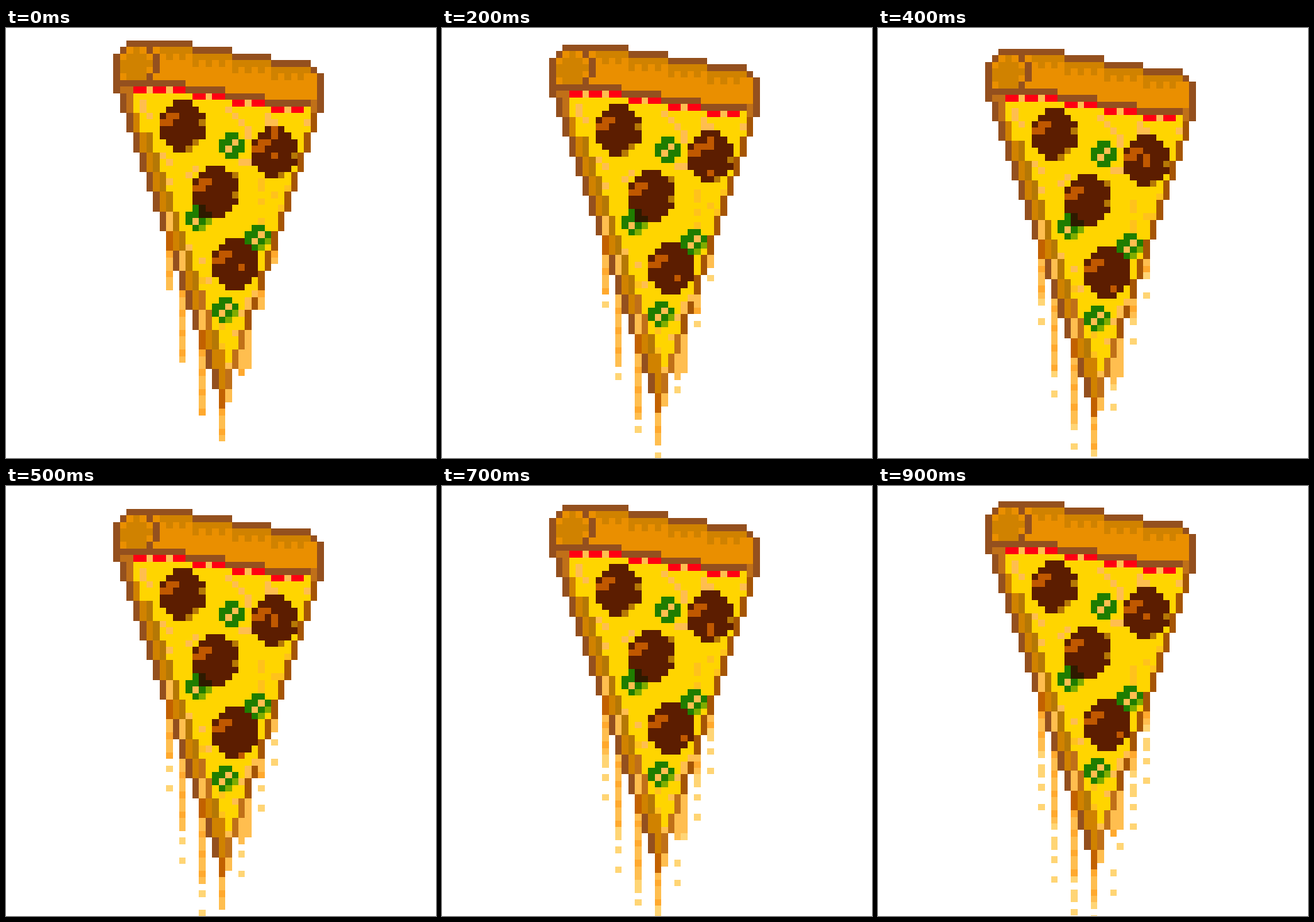
Write an HTML page with a canvas that moves like this. It is 618 px wide and 618 px high and loops after 1000 ms.

```html
<!DOCTYPE html>
<html lang="en">
<head>
<meta charset="utf-8">
<title>Melting pizza slice</title>
<style>
html, body { margin: 0; width: 100%; height: 100%; overflow: hidden; background: #fff; }
canvas { display: block; }
</style>
</head>
<body>
<canvas id="stage" width="618" height="618"></canvas>
<script>
const ctx = document.getElementById('stage').getContext('2d');
const CELL = 9.45, LEFT = 154.45, TOP = 18;
const BOB = [0, 3, 6, 9, 12, 15, 12, 9, 6, 4];

const BROWN = '#94501e', RIM = '#a55505', COPPER = '#c07018', RUST = '#c26100';
const ORANGE = '#ea8f00', AMBER = '#d08200', OLIVE = '#b57805';
const CHEESE = '#ffd500', TAN = '#ffbe4f', GLOW = '#ffa92e', PALE = '#ffd575', GOLD = '#ffc21c';
const RED = '#ff0012', MEAT = '#5c1d00', SHINE = '#c05800', GREEN = '#1f7d00', LIME = '#80ac00';

let bob = 0;

function put(color, col, row, w = 1, h = 1) {
  const x = Math.round(LEFT + col * CELL), y = Math.round(TOP + row * CELL);
  ctx.fillStyle = color;
  ctx.fillRect(x, y + bob,
    Math.round(LEFT + (col + w) * CELL) - x,
    Math.round(TOP + (row + h) * CELL) - y);
}

// Single cells given as "col,row col,row ..."
function dots(color, cells) {
  for (const cell of cells.split(' ')) {
    const [col, row] = cell.split(',').map(Number);
    put(color, col, row);
  }
}

// Each step is three rows high and moves both edges in by one column.
function drawBody() {
  put(BROWN, 1, 7);
  put(COPPER, 2, 7);
  put(CHEESE, 3, 7, 20);
  for (let c = 1; c <= 16; c++) {
    const row = 3 * c + 5, low = c >= 13;
    if (c < 16) put(CHEESE, c + 1, row, 31 - 2 * c, 3);
    if (c < 3) put(c === 1 ? COPPER : AMBER, c + 1, row, 1, 3);
    else if (c < 16) {
      put([7, 9, 12].includes(c) ? TAN : AMBER, c + 1, row, 1, 3);
      if (c < 15) put(c === 14 ? AMBER : c === 11 || c === 12 ? COPPER : OLIVE, c + 2, row, 1, 3);
    }
    put(low ? COPPER : RIM, 32 - c, row, 1, 3);
    put([8, 13, 16].includes(c) ? RUST : BROWN, c, row, 1, 3);
  }
  dots(TAN, '4,9 5,11 4,10 17,10 18,11 19,12 20,13 20,14 23,11 23,12 24,12 29,12 19,18 20,18 ' +
    '7,17 8,18 8,21 11,20 12,19 11,31 13,33 14,36 21,38 20,39 20,40 19,41 18,44 17,49');
  dots(GOLD, '26,22 25,25 13,36 16,43 16,46');
}

function drawCrust() {
  for (let col = 6; col < 30; col++) {
    const top = Math.floor(col / 6) - 1;
    const end = 5 + Math.min(4, Math.max(1, Math.floor((col + 1) / 6)));
    put(ORANGE, col, top + 1, 1, end - top - 1);
    put(AMBER, col, top + 1, 1, col % 2 ? 1 : 2);
    put(BROWN, col, top);
    put(BROWN, col, end);
  }
  put(ORANGE, 30, 5, 1, 4);
  put(COPPER, 30, 9, 1, 2);
  put(BROWN, 30, 4);
  put(BROWN, 31, 5, 1, 6);

  put(BROWN, 2, 0, 4);
  put(BROWN, 0, 2, 1, 6);
  put(BROWN, 1, 6, 5);
  put(COPPER, 1, 7);
  put(AMBER, 1, 2, 5, 3);
  put(AMBER, 2, 1, 3, 5);
  dots(ORANGE, '2,1 4,1 1,2 1,5 5,2 5,4 6,1 6,5');
  dots(BROWN, '1,1 5,1 6,2 6,3 6,4 5,5');

  for (let col = 3; col <= 27; col += 3) {
    const row = 6 + Math.max(1, Math.floor(col / 6));
    put(RED, col, row, 2);
    if (col % 6 === 0 || col === 3) put(TAN, col + 2, row);
  }
}

function pepperoni(col, row) {
  [3, 5, 7, 7, 7, 7, 5, 3].forEach((w, i) => put(MEAT, col + (7 - w) / 2, row + i, w));
  put(SHINE, col + 1, row + 2, 2);
  put(SHINE, col, row + 3, 2);
}

function pepper(col, row, last) {
  ['.GG.', 'GGTG', 'GTGL', '.GL.'].forEach((line, i) => {
    [...line].forEach((ch, j) => {
      if (ch !== '.') put(ch === 'T' ? TAN : ch === 'L' ? last : GREEN, col + j, row + i);
    });
  });
}

function drawToppings(n) {
  const slide = Math.floor(n / 2);
  put(GOLD, 22, 21 + slide, 1, 2);
  put(GOLD, 22, 24 + slide);
  put(GOLD, 24, 23 + slide % 3);
  put(GOLD, 22, 27);

  pepperoni(7, 9);
  pepperoni(21, 13);
  pepperoni(12, 19);
  pepperoni(15, 30);
  dots(OLIVE, '13,12 12,15 11,16 18,20 18,23 27,17 25,20');

  // Grease running over two of the slices
  if (n < 8) put(SHINE, 24, 13 + Math.floor(n * 0.75), 1, 2);
  if (n < 4) put(SHINE, 24, 17 + n);
  if (n === 9) put(SHINE, 24, 17);
  if (n < 6) put(SHINE, 19, 34 + Math.floor(n * 0.7));
  else put(SHINE, 20, 35);

  pepper(16, 14, GREEN);
  pepper(11, 25, LIME);
  pepper(20, 28, LIME);
  pepper(15, 39, LIME);
  dots('#2e1a00', '13,25 13,26 14,26');
}

function drip(col, row, end, n, starts) {
  for (let r = row; r < end; r++) put((r - n + 9) % 3 === 2 ? GLOW : TAN, col, r);
  for (const s of starts) if (n >= s) put(PALE, col, end + n - s);
}

function drawDrips(n) {
  put(TAN, 17, 53, 1, 2);
  put(TAN, 20, 44, 1, 6);
  put(TAN, 19, 47, 1, 3);
  const all = [1, 4, 6, 7, 9];
  drip(8, 32, 38, n, all);
  drip(10, 38, 49, n, all);
  drip(13, 47, 57, n, all);
  drip(16, 56, 61, n, all);
  drip(22, 38, 41, n, all);
  drip(24, 32, 34, n, all);
  drip(19, 50, 51, n, [1, 4]);
  drip(20, 50, 50, n, [7]);
}

function draw(now) {
  const n = Math.floor((now % 1000) / 100);
  bob = 0;
  ctx.fillStyle = '#fff';
  ctx.fillRect(0, 0, 618, 618);
  bob = BOB[n];
  drawBody();
  drawCrust();
  drawToppings(n);
  drawDrips(n);
}

const start = performance.now();
function loop() {
  draw(performance.now() - start);
  requestAnimationFrame(loop);
}
loop();
</script>
</body>
</html>
```
